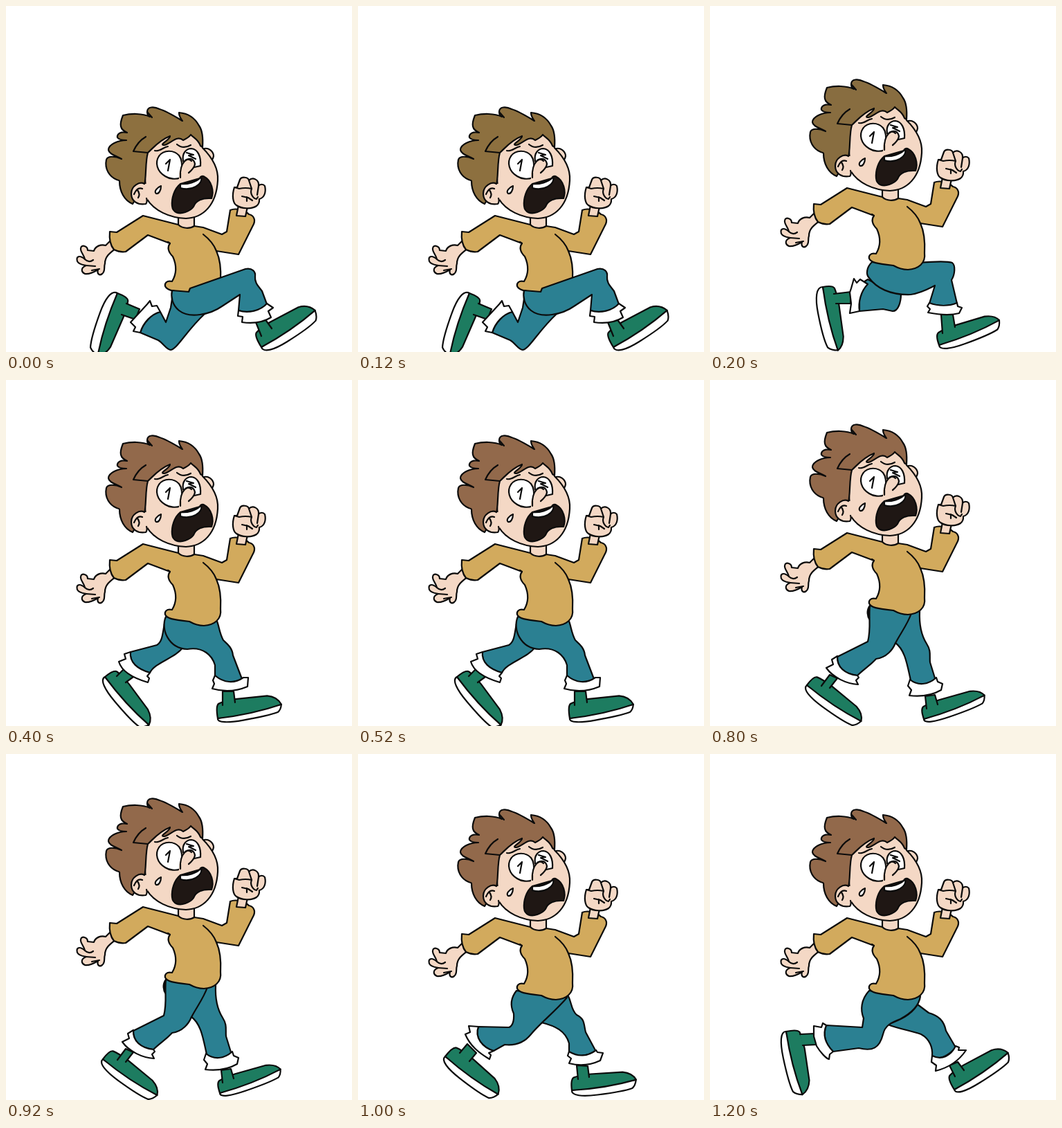
Recreate the animation shown at these times as an HTML page with a canvas. Size 500 px wide and 500 px high, loop 1.4 s.

```html
<!DOCTYPE html>
<html lang="en">
<head>
<meta charset="utf-8">
<title>Running boy</title>
<style>
html, body { margin: 0; width: 100%; height: 100%; overflow: hidden; background: #fff; }
canvas { display: block; width: 500px; height: 500px; }
</style>
</head>
<body>
<canvas id="stage" width="500" height="500"></canvas>
<script>
const ctx = document.getElementById('stage').getContext('2d');
const STEP = 200;
const INK = '#0b0b0b', SKIN = '#f4d8c5', SHIRT = '#d2aa5d', PANTS = '#2b8092',
      GREEN = '#1d7c60', WHITE = '#fff', MOUTH = '#1f1714', BROWN = '#92694b';

// shoe: [heel x, heel y, angle, upper height, sole depth]
const poses = [
  { y: 0, hair: '#8d703f', nearOnTop: true,
    far: {
      shoe: [161, 415, 110, 20, 14],
      sock: 'M174 430L193 438L187 453L167 446',
      pants: 'M242 410L238 436L231 457L223 442C210 445 198 458 194 472L220 483C228 488 232 497 238 497C248 495 260 470 288 444L270 415Z',
      cuff: 'M180 457L204 431L208 426L211 434L218 433L223 442C210 445 198 458 194 472L184 470L187 464Z'
    },
    near: {
      shoe: [369, 493, -32, 24, 13],
      sock: 'M369 477L361 457L374 452L384 466',
      pants: 'M266 408L346 380C356 378 361 384 360 391C359 400 365 405 370 412L377 431C366 442 350 444 336 440L338 417L312 434C295 446 265 452 250 440C240 432 238 420 240 411L264 413Z',
      cuff: 'M336 440C350 445 368 440 377 430L386 436L379 441L383 450C370 458 355 459 341 457L342 449L335 448Z'
    } },
  { y: -40, hair: '#886d40',
    far: {
      shoe: [163, 406, 79, 18, 14],
      sock: 'M179 416L204 413L203 430L182 430',
      pants: 'M216 403L228 395L260 412L276 416C276 428 272 441 264 441L250 438L216 441Z',
      cuff: 'M208 394L212 400L217 395L228 402C218 412 214 428 216 441L202 444L204 430L202 414L204 408Z'
    },
    near: {
      shoe: [331, 490, -20, 19, 11],
      sock: 'M336 473L334 446L351 446L354 464',
      pants: 'M234 370C226 378 225 388 230 393C240 407 260 418 290 417C305 415 315 409 325 404L317 430C330 434 345 434 357 430L349 396C354 388 355 375 350 371C343 368 325 369 300 371Z',
      cuff: 'M317 429C330 434 345 434 357 429L358 434L364 436L360 444C345 448 330 446 315 443L318 438L314 434Z'
    } },
  { y: -66, hair: BROWN,
    far: {
      shoe: [143, 429, 50, 20, 12],
      sock: 'M160 428L170 418L184 429L173 437',
      pants: 'M229 352C226 368 226 378 218 383L180 393C178 408 190 418 208 423C215 408 245 402 256 386L240 350Z',
      cuff: 'M180 393L171 396L173 403L163 407C168 424 188 432 205 437L207 431L204 428L208 423C190 418 178 408 180 393Z'
    },
    near: {
      shoe: [306, 489, -10, 23, 9],
      sock: 'M313 470L313 450L329 450L331 466',
      pants: 'M231 342C223 360 235 388 262 389C285 385 298 398 302 412L302 432C315 438 330 438 341 432L328 398C327 386 318 380 314 376C308 365 308 355 304 346Z',
      cuff: 'M302 427C315 438 330 439 343 430L350 430L349 443C330 451 312 450 298 446L301 439L299 434Z'
    } },
  { y: -96, hair: BROWN,
    far: {
      shoe: [191, 461, 17, 20, 11],
      sock: 'M205 454L209 440L226 443L222 455',
      pants: 'M234 314C226 330 225 350 236 368C240 380 232 388 208 414C214 425 228 432 241 430C245 410 265 400 272 370L262 340Z',
      cuff: 'M207 415C215 427 230 432 243 429L250 432L247 440C230 445 215 441 198 434L202 427L199 421Z'
    },
    near: {
      shoe: [278, 489, 0, 25, 10],
      sock: 'M290 470L292 447L308 450L307 470',
      pants: 'M236 314C228 330 230 355 258 361C275 362 282 380 286 400L286 428C295 434 310 437 320 434C321 410 318 385 311 368C306 355 304 340 302 320Z',
      cuff: 'M286 422C295 434 310 437 322 432L327 436L328 447C310 453 295 450 277 442L280 435L278 430Z'
    } },
  { y: -82, hair: BROWN, seat: 'M231 326C226 333 227 341 231 347Z',
    far: {
      shoe: [309, 490, -19, 19, 9],
      sock: 'M313 475L311 457L325 455L329 469',
      pants: 'M288 334L268 380C282 390 285 412 290 434C300 442 315 440 326 434L318 408C317 398 320 392 313 381C306 370 302 355 303 334Z',
      cuff: 'M289 433C300 442 315 441 327 430L329 436L336 439L334 448C320 456 305 458 288 456L291 448L286 442Z'
    },
    near: {
      shoe: [140, 441, 36, 20, 12],
      sock: 'M161 442L173 426L184 431L173 445',
      pants: 'M231 326C229 342 233 360 228 378L184 400C183 415 195 425 213 427C222 418 232 412 240 403C255 401 264 390 268 380C276 365 286 352 291 337Z',
      cuff: 'M184 399C183 415 195 425 213 427L215 430L211 434L214 440C197 439 178 430 168 416L178 411L176 404Z'
    } },
  { y: -66, hair: BROWN,
    far: {
      shoe: [309, 486, -7, 20, 11],
      sock: 'M318 470L316 450L332 451L334 467',
      pants: 'M302 350L265 388C285 393 300 400 305 418L305 432C318 438 332 436 344 430L329 402C326 390 328 383 316 377C308 370 309 360 304 350Z',
      cuff: 'M305 430C318 438 332 437 344 428L346 431L354 432L350 443C335 450 320 451 305 447L308 440L303 436Z'
    },
    near: {
      shoe: [126, 437, 38, 22, 12],
      sock: 'M147 432L158 419L171 432L161 444',
      pants: 'M229 342C221 352 219 362 225 375C226 388 222 394 218 395L174 394C168 410 180 424 196 429L212 420C230 422 242 415 250 405C262 390 285 372 302 352Z',
      cuff: 'M174 394L160 393L162 402L155 405C162 422 175 432 190 441L192 435L189 432L196 429C180 424 168 410 174 394Z'
    } },
  { y: -66, hair: BROWN,
    far: {
      shoe: [353, 485, -32, 23, 11],
      sock: 'M354 466L346 450L358 445L367 457',
      pants: 'M300 362C290 378 275 384 257 391C275 398 292 400 305 405C318 412 322 425 321 436C330 444 345 436 355 424L341 400C338 385 330 378 316 374Z',
      cuff: 'M321 436C335 443 348 436 355 422L360 424L359 428L370 428C362 440 350 452 326 458L327 450L320 445Z'
    },
    near: {
      shoe: [110, 401, 78, 21, 12],
      sock: 'M130 405L151 404L154 420L134 421',
      pants: 'M230 342C218 355 217 370 222 382L220 395L168 392C162 407 168 420 178 430L215 425C235 430 245 425 250 405C253 392 262 388 275 383C290 375 302 365 304 350Z',
      cuff: 'M168 392L163 389L161 395L150 393L150 408L154 422C160 432 168 440 172 441L173 434L178 430C168 420 162 407 168 392Z'
    } }
];

// [fill, outline, extra fill without a line]; "hair" takes the pose's hair colour
const body = [
  [SKIN, 'M151 339L144 346C137 344 129 347 127 354L118 353C118 347 109 344 108 350C107 355 113 360 114 366C106 359 101 362 103 369C106 374 112 374 116 375C108 378 108 384 114 387C120 388 128 384 133 381C131 387 135 390 139 387C144 383 141 378 143 372C143 362 150 357 159 350'],
  ['', 'M114 366C118 370 122 370 126 367M116 375L129 376M124 382L135 380'],
  [SKIN, 'M249 303L249 318C256 323 268 322 272 319L272 303Z'],
  [SHIRT, 'M249 316L198 303L160 327L150 326C149 336 151 346 156 352C162 355 168 356 173 355L205 331L237 343C232 350 236 357 241 362C247 375 246 388 240 398C232 396 229 401 230 405C233 411 240 412 265 415C274 420 280 421 286 421C301 420 312 412 310 397C311 380 309 365 304 354L336 359L358 315C361 308 357 302 351 301C346 296 333 291 324 295L319 326L312 330L285 320L272 318C266 322 255 322 249 316Z'],
  ['', 'M285 330C294 337 301 346 304 354M237 343L234 341'],
  [SKIN, 'M336 288L333 303L346 304L349 290Z'],
  [SKIN, 'M330 262C326 274 328 285 333 288C340 293 355 294 362 289C367 285 366 281 366 279C374 277 376 268 374 260C372 257 367 257 365 260C366 250 356 247 351 252C350 247 340 246 338 251L334 262Z'],
  ['', 'M330 262L337 264Q346 262 355 264M351 252L355 264M365 260L363 273M355 264C352 271 357 278 362 279L364 276M341 275L350 277L356 281M348 276L348 282'],
  [SKIN, 'M284 207C292 203 300 210 300 217C299 222 297 224 293 223Z'],
  [SKIN, 'M284 205C300 221 307 238 306 252C304 288 285 306 260 307C236 306 214 296 203 278L201 250', 'M201 252L206 206L238 182L282 186L285 207Z'],
  ['hair', 'M284 204C285 190 284 180 279 173C272 160 262 155 250 154C250 160 253 163 255 166C245 160 232 152 222 149C214 145 204 145 204 153C204 156 206 159 208 160C197 155 181 155 169 158C167 163 165 170 166 174C167 179 171 181 175 183C167 181 160 184 161 190C163 193 169 194 174 194C162 194 148 200 148 208C149 214 158 216 167 221C158 217 147 216 145 222C142 236 150 247 160 251Q164 252 164 253C164 268 171 281 183 286L200 258C203 247 201 226 205 212C212 206 221 194 237 188C238 193 219 201 229 201C238 199 247 186 256 194C260 192 265 189 267 186C272 191 278 193 281 202Z'],
  ['', 'M205 212L184 210C188 201 195 193 202 189M204 153L211 161'],
  [SKIN, 'M200 257C193 253 181 260 181 271C181 282 190 288 202 286C204 284 204 280 203 278', 'M198 257L204 257L205 280L200 284Z'],
  ['', 'M185 272C188 265 192 262 197 264M190 266C193 270 193 274 191 277'],
  ['', 'M215 209C222 211 227 204 234 203M247 200C253 205 260 205 267 201'],
  [WHITE, 'M252 248C246 251 236 250 230 246C218 239 215 226 221 217C228 207 243 208 250 216C254 221 255 229 254 240Z'],
  [WHITE, 'M256 224C254 212 261 206 268 206C277 207 282 217 281 231L272 233Z'],
  [SKIN, 'M252 240C254 220 270 215 273 228C273 232 268 238 264 241', 'M250 242L255 226L272 226L272 236L262 246L250 252Z'],
  ['', 'M252 248L252 241M231 228L237 222L234 238M261 212L271 215L264 216L274 221M259 223Q264 220 268 224'],
  [MOUTH, 'M252 257C243 264 239 278 240 289C241 299 250 301 259 298C265 296 269 293 271 290C274 281 284 277 297 278C301 268 297 252 287 247C284 245 281 246 280 249Z'],
  [WHITE, 'M252 257C262 258 275 255 282 247C285 258 268 268 252 263Z'],
  [WHITE, 'M224 260C219 262 213 268 217 271C221 272 224 266 224 260Z']
];

function paint(fill, d, extra) {
  const path = new Path2D(d);
  if (fill) {
    ctx.fillStyle = fill;
    if (extra) ctx.fill(new Path2D(extra));
    ctx.fill(path);
  }
  ctx.stroke(path);
}

function drawShoe([x, y, angle, h, d]) {
  ctx.save();
  ctx.translate(x, y);
  ctx.rotate(angle * Math.PI / 180);
  paint(WHITE, `M0 0C-2 ${d * 0.7} 14 ${d} 36 ${d}C58 ${d} 78 ${d * 0.9} 87 ${d * 0.7}Q92 ${d * 0.4} 94 -4Z`);
  paint(GREEN, `M0 0Q0 ${-h * 0.8} 5 ${-h * 0.9}Q12 ${-h} 30 ${-h}L76 ${-h * 0.86}Q90 ${-h * 0.7} 94 -4Q50 3 0 0Z`);
  ctx.restore();
}

function drawLeg(leg) {
  drawShoe(leg.shoe);
  paint(GREEN, leg.sock);
  paint(PANTS, leg.pants);
  paint(WHITE, leg.cuff);
}

function drawBody(pose) {
  ctx.save();
  ctx.translate(0, pose.y);
  for (const [fill, d, extra] of body) paint(fill === 'hair' ? pose.hair : fill, d, extra);
  ctx.restore();
}

function draw(pose) {
  ctx.fillStyle = WHITE;
  ctx.fillRect(0, 0, 500, 500);
  ctx.strokeStyle = INK;
  ctx.lineWidth = 2.2;
  ctx.lineJoin = ctx.lineCap = 'round';
  drawLeg(pose.far);
  if (pose.seat) paint(INK, pose.seat);
  if (pose.nearOnTop) {
    drawBody(pose);
    drawLeg(pose.near);
  } else {
    drawLeg(pose.near);
    drawBody(pose);
  }
}

const start = performance.now();
function tick() {
  const t = Math.max(0, performance.now() - start);
  draw(poses[Math.floor(t / STEP) % poses.length]);
  requestAnimationFrame(tick);
}
tick();
</script>
</body>
</html>
```
